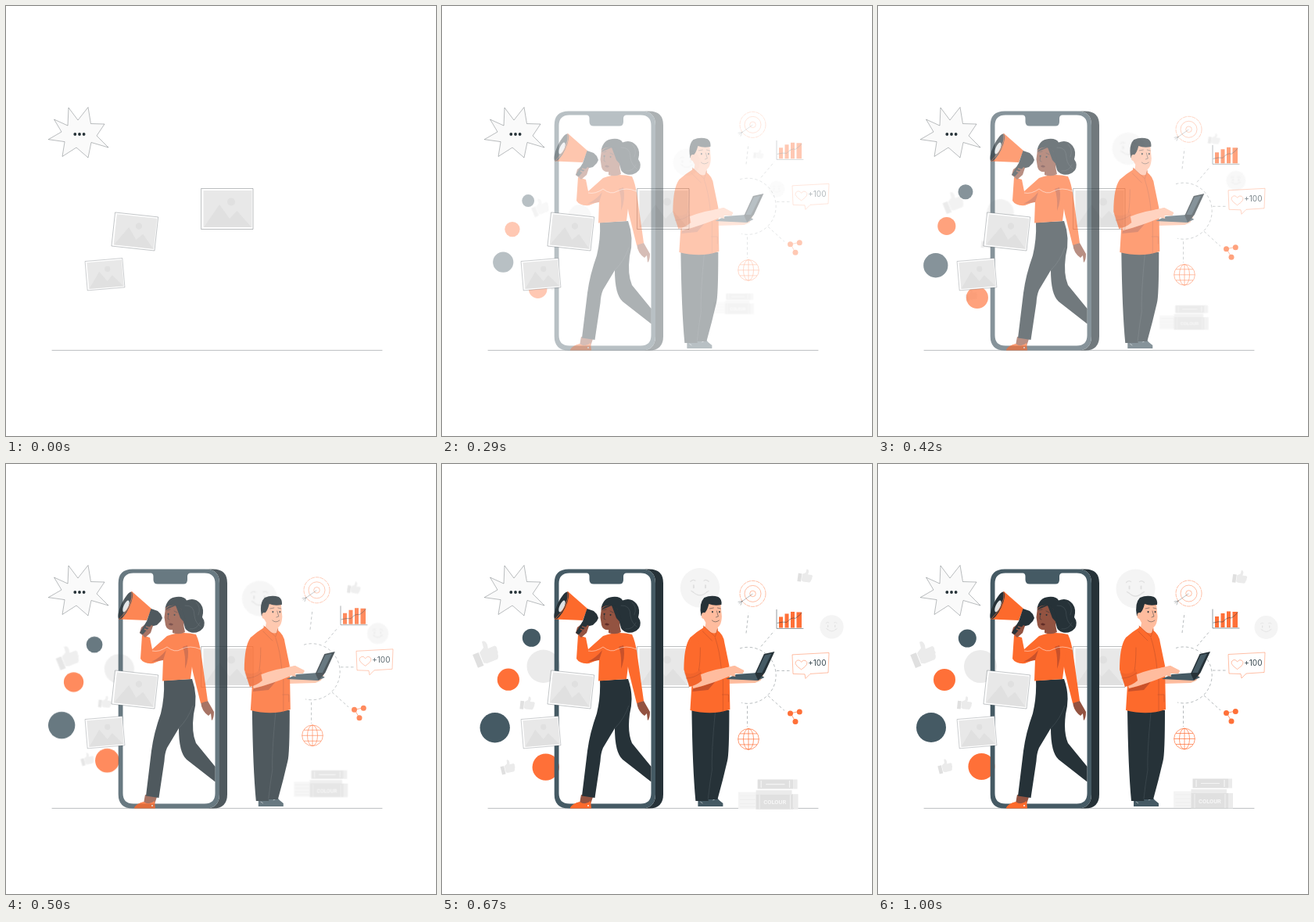
An HTML page for the animation above (1.04 s loop, 550 px wide and 550 px high).

```html
<!DOCTYPE html>
<html lang="en">
<head>
<meta charset="utf-8">
<title>Social media campaign</title>
<style>
  html, body { margin: 0; height: 100%; overflow: hidden; background: #fff; }
  svg { display: block; width: 100vw; height: 100vh; }
  .dark { fill: #263238; }
  .slate { fill: #455a64; }
  .orange { fill: #ff7038; }
  .cloth { fill: #fd6a2c; }
  .shade { fill: #c9512a; }
  .brown { fill: #935341; }
  .peach { fill: #ffbc9e; }
  .light { fill: #ebebeb; }
  .grey { fill: #e0e0e0; }
  .ink, .edge { fill: none; stroke: #263238; stroke-width: .5; stroke-linecap: round; stroke-linejoin: round; }
  .edge { stroke-width: .32; }
  .line { fill: none; stroke: #ff7038; stroke-width: .7; }
  .fine { stroke-width: .45; }
  .dash { fill: none; stroke: #6d767a; stroke-width: .5; stroke-dasharray: 3.5 3; }
  .white { fill: none; stroke: #fff; stroke-width: .5; }
</style>
</head>
<body>
<svg viewBox="0 0 550 550">
  <defs>
    <g id="photo">
      <rect class="edge" x="-33" y="-26" width="66" height="52" style="fill:#fff"/>
      <rect x="-30.5" y="-23.5" width="62" height="47" fill="#e8e8e8"/>
      <path class="grey" d="M-30 23.5L-10 -5.5L3 12.5L12.5 2.5L31 23.5Z"/>
      <circle class="grey" cx="5" cy="-9" r="5"/>
    </g>
    <g id="thumb">
      <path class="grey" d="M-16 -5H-8V13H-16Z"/>
      <path class="light" d="M-7 -4L0 -8L1 -16Q6 -17 6 -10L5 -5H14Q17 -3 15 1Q16 4 14 6Q14 10 11 12H-3L-7 10Z"/>
    </g>
    <g id="smiley">
      <circle r="25" fill="#f4f4f4"/>
      <g style="fill:none;stroke:#e0e0e0;stroke-width:1.2;stroke-linecap:round">
        <path d="M-12 -8Q-9 -11 -6 -9M5 -9Q8 -11 11 -8M-9 5Q0 14 9 5M-11 4L-8 6M8 6L11 4"/>
        <path d="M-8 -3V0M7 -3V0" stroke-width="2"/>
      </g>
    </g>
  </defs>

  <path class="edge" d="M59 440.4H481" stroke-width=".4"/>

  <g id="backdrop">
    <use href="#smiley" transform="translate(329.5 159.5)"/>
    <use href="#smiley" transform="translate(496.5 209) scale(.6)"/>
    <use href="#thumb" transform="translate(463 145) rotate(8) scale(.58)"/>
    <use href="#thumb" transform="translate(58 243) rotate(-22)"/>
    <use href="#thumb" transform="translate(111 306.5) rotate(6) scale(.58)"/>
    <use href="#thumb" transform="translate(86 387) rotate(-14) scale(.58)"/>
    <circle class="light" cx="131" cy="259" r="21"/>
    <path d="M378 418.5H401V440H378Z" fill="#f4f4f4"/>
    <path d="M380 423H400M380 428H400M380 433H400M380 437H400" stroke="#ebebeb" stroke-width=".7"/>
    <path class="grey" d="M402.5 402.5H448V414.5H402.5Z"/>
    <path class="light" d="M448 402.5H453V414.5H448Z"/>
    <path d="M407 404V413M443 404V413M413 408.5H437" stroke="#f4f4f4" stroke-width="1.2"/>
    <path class="grey" d="M400.5 421H448V440.5H400.5Z"/>
    <path class="light" d="M400.5 416H446V421H400.5ZM448 421H454V440.5H448Z"/>
    <path d="M405 422V440M444 422V440" stroke="#f0f0f0"/>
    <text x="424.5" y="433.8" text-anchor="middle" style="font:700 7.5px Roboto,sans-serif;fill:#f6f6f6">COLOUR</text>
  </g>

  <use href="#photo" x="283" y="259.5"/>

  <g id="badges">
    <circle class="slate" cx="114.3" cy="223" r="11.5"/>
    <circle class="orange" cx="85" cy="276" r="14"/>
    <circle class="slate" cx="68" cy="337" r="19"/>
    <circle class="orange" cx="132.4" cy="387" r="17"/>
  </g>

  <g id="phone">
    <path class="dark" d="M255 134.5H265Q283 134.5 283 152.5V422.5Q283 440.5 265 440.5H255Q273 440.5 273 422.5V152.5Q273 134.5 255 134.5Z"/>
    <path class="slate" fill-rule="evenodd" d="M162 134.5H255Q273 134.5 273 152.5V422.5Q273 440.5 255 440.5H162Q143.700 440.5 143.700 422.5V152.5Q143.700 134.5 162 134.5Z
      M163 139.500Q149.500 139.500 149.500 153V421Q149.500 434.500 163 434.500H254Q267.500 434.500 267.500 421V153Q267.500 139.500 254 139.500H236Q232 139.500 232 144V148Q232 153.500 227 153.500H194Q188.500 153.500 188.500 148V144Q188.500 139.500 185 139.500Z"/>
  </g>

  <g id="woman">
    <path class="brown" d="M178 423L193 426L190 435L176 434Z"/>
    <path class="cloth" d="M164 439.5Q167 434 176 432Q183 437 190 431L191 440.5H164Z"/>
    <circle cx="187" cy="437" r="1" fill="#fff"/>
    <path class="dark" d="M202 277L238 275Q246 297 240 320Q237 343 243 357L267.500 387V406.500L231 378Q221 369 221 338L206 363Q203 370 202.500 380L195.500 427L179 424.500L186 367Q189 344 198 319Q203 298 202 277Z"/>
    <path class="white" d="M239 309Q233 326 221 338" style="stroke:#4a575d"/>
    <path class="brown" d="M249 304L258 303L266 317Q266 326 263 328L262 319L259 322Q250 316 249 304Z"/>
    <path class="cloth" d="M233 221L243 218Q247 226 249.5 242L258 303L249 306L239 266L236 248Z"/>
    <path class="cloth" d="M206 220Q224 213 243 218L236 275L200 277.5L201 250L188 255Q176 256 172 249L174 219L184 222L187 237Z"/>
    <path class="shade" d="M186 253Q197 248 205 238L201 251ZM226 234Q230 243 229 262Q235 247 232 232Z"/>
    <path class="white" d="M187 239Q196 241 206 234Q216 242 224 237Q235 231 249 237"/>
    <path class="dark" d="M203.500 185Q206 171 218 170Q228 169 231 174.500Q242 170 249 179Q254 186 251 196Q256 203 252 210Q246 217 237 215.500Q229 214 228 206L220 182Z"/>
    <path class="brown" d="M204 184Q214 177 224 185L227 199Q227 208 229 215Q222 219 213 216L213 212Q206 213 204 206L202.500 196Z"/>
    <path class="dark" d="M203 187Q210 179 222 181L228 193L231 206L223 197Q219 186 217 181Z"/>
    <path class="ink" d="M206 187L210 186M215 188L219 190M208 191L207 198L209 199"/>
    <path d="M208 205Q210 202 214 205Q212 208 208 205Z" fill="#5f2c27"/>
    <path class="dark" d="M207.5 191a1 1 0 1 0 .1 0M215.5 192a1 1 0 1 0 .1 0"/>
    <path class="ink" d="M229 181Q241 180 241 194Q242 203 249 208M243 177Q250 183 246 193M235 211Q244 212 248 203" style="stroke:#4a575d"/>
    <path class="cloth" d="M161 163L186 185L180 200L144.5 198.5Q145 176 161 163Z"/>
    <ellipse class="dark" cx="152.8" cy="181" rx="5.4" ry="19" transform="rotate(25 152.8 181)"/>
    <ellipse cx="153.5" cy="182" rx="3" ry="8" transform="rotate(24 153.5 182)" fill="#dfe3e5"/>
    <path class="line" d="M161 163Q163 181 144.5 198.5"/>
    <path class="dark" d="M185.5 185L194 188L198 192L200 197L198 201L193 206L185 208L180 201Z"/>
    <path class="brown" d="M181 203L188 207L185 216L178 222L171 216L173 209Z"/>
    <path class="dark" d="M180 201L187 205L175 218L171 216Z"/>
    <path d="M177 211L184 214M179 208L186 210" stroke="#935341" stroke-width="1.8"/>
  </g>

  <use href="#photo" transform="translate(165 288.5) rotate(6.2) scale(.833)"/>
  <use href="#photo" transform="translate(126.7 343.2) rotate(-4.8) scale(.72)"/>
  <path class="edge" style="fill:#fafafa" d="M54.5 170.5L71 161L61.5 145L79 153L80 130L92 146L105 129.5L108.5 150.5L126 151L116 166L131 181L109 174.5L105 194L90 181L72 192.5L75 174Z"/>
  <g class="dark"><circle cx="88.3" cy="164" r="1.9"/><circle cx="94" cy="164" r="1.9"/><circle cx="99.6" cy="164" r="1.9"/></g>

  <g id="icons">
    <path class="dash" d="M381 235.4A36 36 0 1 1 383 305M389 216L392 190M408 233L425 213M428 264H446M417 296L438 315M390.5 309V336"/>
    <g class="line fine">
      <circle cx="397.5" cy="165.5" r="16.5" stroke-dasharray="5 .8"/>
      <circle cx="397.5" cy="165.5" r="10.5"/>
      <circle cx="397.5" cy="165.5" r="3.8"/>
    </g>
    <path class="edge" d="M397 166L380 178M384 175L379 176M384 175L382 180"/>
    <path class="orange" d="M431 195h5v14h-5zM438.5 191h5v18h-5zM446 188.5h5v20.5h-5zM453.5 189h6.500v20h-6.500z"/>
    <path class="ink" d="M428 186V210H462M429 203Q436 201 441 202Q447 195 452 197Q457 194 460 190"/>
    <path class="line fine" d="M448 243.5L495 241L494 266.5L471 268L465 274L464 268.5L449 268Z"/>
    <path class="line fine" d="M459.5 262.5Q447 254 455 250.5Q458 250 459.5 253Q462 249.5 465 251Q471 255 459.5 262.5Z"/>
    <text x="468.2" y="257.8" style="font:400 10px Inter,sans-serif;fill:#37474f">+100</text>
    <path class="line" d="M457 316L446 318.5L452 329"/>
    <g class="orange"><circle cx="445.5" cy="318.5" r="3.5"/><circle cx="457.3" cy="316.5" r="3.5"/><circle cx="452" cy="329" r="3.5"/></g>
    <g class="line"><circle cx="392" cy="351.5" r="13.3"/><ellipse cx="392" cy="351.5" rx="6.5" ry="13.3"/>
      <path d="M392 338V365M378.5 351.5H405.5M381 344.5H403M381 358.5H403"/></g>
  </g>

  <g id="man">
    <path class="slate" d="M327 429H341V438H327ZM338 428L350 425Q354 431 359 434V438H334Z"/>
    <path class="white" d="M330 432L333 434M346 430L350 428"/>
    <path class="dark" d="M319 313L367 315Q367 371 364.5 380Q359 404 352 429L340 429L340.500 431H324Q320 390 319 313Z"/>
    <path class="ink" style="stroke:#4a575d" d="M349 318Q344 370 345 391Q342 409 340 428"/>
    <path class="peach" d="M366 274L393 275L405 268L411 264Q413 268 407 277L400 280L366 281Z"/>
    <path class="cloth" d="M317 222Q326 214 336 208L351 212Q360 218 361 229L367 258L368 314Q345 322 317 315L319 283Z"/>
    <path class="shade" d="M321 287Q338 284 352 275L340 289L320 291Z"/>
    <path class="peach" d="M337 203H353L352 214Q347 221 336 209Z"/>
    <path class="cloth" d="M334 207L349 221L345 226L333 214ZM352 210L349 221L354 224Z"/>
    <path class="ink" style="stroke:#b84c28" d="M334 207L349 221L352 211M333 214L345 226M349 222Q355 240 357 263M359 275V317M358 295H366V304"/>
    <path class="peach" d="M317 275Q340 264 360 261L374 258L386 264L384 268L374 268L366 272Q345 281 321 287Z"/>
    <path class="cloth" d="M317 222Q326 219 330 235L329 262L332 277Q325 283 316 285L309 263Q309 233 317 222Z"/>
    <path class="shade" d="M309 266Q321 272 330 262L332 277Q325 283 316 285Z" opacity=".2"/>
    <path class="ink" style="stroke:#b84c28" d="M330 235Q330 254 328 264M312 274Q322 274 331 267"/>
    <path class="slate" d="M363 275L376 269L403 267L412 273L403 277Z"/>
    <path class="dark" d="M400 268L411.5 243L425 240L412.5 267L404 277Z"/>
    <path class="slate" d="M402 267L412.5 244.5L421 242.5L409 267Z"/>
    <path class="peach" d="M361 261L374 258L386 265L384 268L374 267L375 272L370 271Z"/>
    <path class="peach" d="M335 179Q346 172 356 179L357.5 195Q357 209 349 210Q341 210 337 203L333 196Z"/>
    <path class="dark" d="M331 194Q328 178 335 171Q344 167 353 170Q358 173 357 180Q348 182 341 179Q339 187 336 190L335 196Z"/>
    <ellipse class="peach" cx="334.5" cy="194" rx="3" ry="4"/>
    <path class="ink" d="M342 185L347 184M352 184L356 185M351 188L353 195L350 196M345 200Q349 204 354 200"/>
    <path class="dark" d="M345.5 188a.9 1.2 0 1 0 .1 0M354.5 188a.9 1.2 0 1 0 .1 0"/>
  </g>
</svg>
<script>
  const LOOP = 1040, FIRST_HOLD = 80, FPS = 24, LEAD = 0.0775;
  const names = ['backdrop', 'badges', 'phone', 'woman', 'icons', 'man'];
  const parts = Object.fromEntries(names.map(id => [id, document.getElementById(id)]));

  const bezier = (s, a, b) => 3 * (1 - s) ** 2 * s * a + 3 * (1 - s) * s * s * b + s ** 3;

  // cubic-bezier(.36, -.01, .5, 1.38): settles after overshooting
  function ease(x) {
    if (x >= 1) return 1;
    let low = 0, high = 1;
    for (let i = 0; i < 30; i++) {
      const mid = (low + high) / 2;
      if (bezier(mid, 0.36, 0.5) < x) low = mid; else high = mid;
    }
    return bezier(low, -0.01, 1.38);
  }

  // Hidden during the first hold, then steps of 1/24 s aligned to 10 ms.
  function progressAt(ms) {
    if (ms < FIRST_HOLD) return 0;
    const ticks = Math.floor((ms - FIRST_HOLD) / 10) * 10;
    const step = 1 + Math.floor(ticks * FPS / 1000);
    return ease(step / FPS + LEAD);
  }

  const zoom = (x, y, k) => `translate(${x} ${y}) scale(${k}) translate(${-x} ${-y})`;

  function draw(ms) {
    const p = progressAt(ms);
    const scale = 0.5 + 0.5 * p;
    const shift = -22 * (1 - p);
    const opacity = Math.min(1, p);
    for (const el of Object.values(parts)) el.setAttribute('opacity', opacity);
    parts.backdrop.setAttribute('transform', zoom(276, 290, scale));
    parts.badges.setAttribute('transform', zoom(101, 307, scale));
    parts.icons.setAttribute('transform', `translate(0 ${shift})`);
    parts.man.setAttribute('transform', `translate(${shift} 0)`);
  }

  const start = performance.now();
  function frame() {
    draw((performance.now() - start) % LOOP);
    requestAnimationFrame(frame);
  }
  frame();
</script>
</body>
</html>
```
